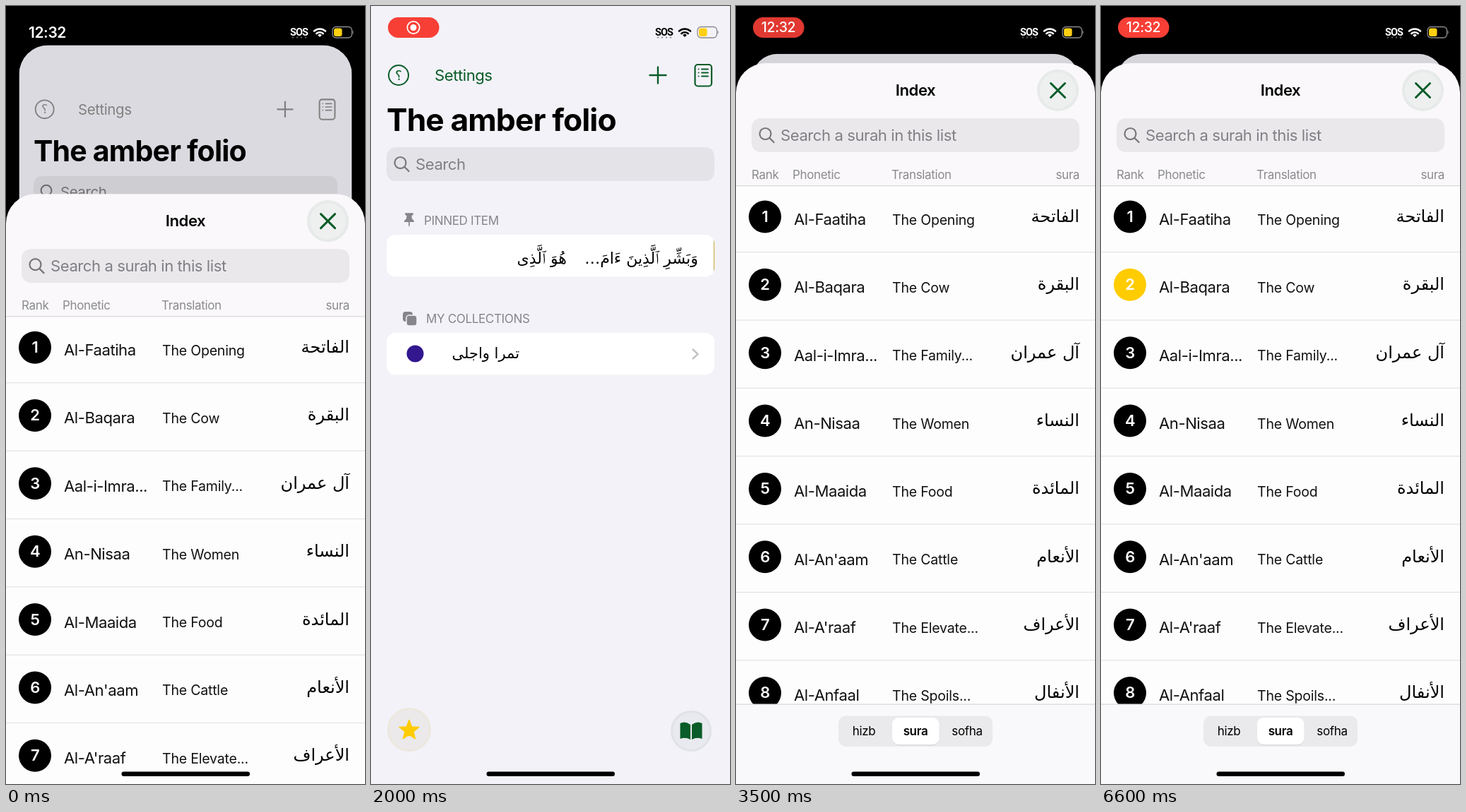
Animation of 508x1102 px, one loop 6.7 s. Source, as an HTML page:

```html
<!DOCTYPE html>
<html lang="en">
<head>
<meta charset="utf-8">
<style>
html, body { margin: 0; width: 100%; height: 100%; overflow: hidden; background: #000; }
svg { display: block; }
text { font-family: Inter, sans-serif; letter-spacing: -.02em; white-space: pre; }
.small { letter-spacing: -.01em; }
.ar { font-family: "DejaVu Sans", sans-serif; letter-spacing: 0; direction: rtl; }
.sos { font-family: Roboto, sans-serif; font-weight: 700; letter-spacing: -.06em; }
.mid { text-anchor: middle; }
.line { fill: none; stroke: currentColor; stroke-linecap: round; stroke-linejoin: round; }
</style>
</head>
<body>
<script>
const LOOP = 6700, STEP = 100, GRAY = '#8e8e93', YELLOW = '#ffcc00', GREEN = [10, 92, 40];
const OPEN_SHEET = 2317, CLOSE_PINNED = 1600, CLOSE_ROW = 4840, PITCH = 96.35;

const text = (x, y, size, str, attrs = '') =>
  `<text x="${x}" y="${y}" font-size="${size}" ${attrs}>${str}</text>`;
const rect = (x, y, w, h, fill, r = 0, attrs = '') =>
  `<rect x="${x}" y="${y}" width="${w}" height="${h}" rx="${r}" fill="${fill}" ${attrs}/>`;
const circle = (x, y, r, fill, attrs = '') =>
  `<circle cx="${x}" cy="${y}" r="${r}" fill="${fill}" ${attrs}/>`;
const line = (d, width, attrs = '') => `<path class="line" d="${d}" stroke-width="${width}" ${attrs}/>`;
const at = (x, y, body, attrs = '') => `<g transform="translate(${x} ${y})" ${attrs}>${body}</g>`;

const pin = '<path d="M-10-17H10V-13L6-10 7-2Q12 0 12 5H-12Q-12 0-7-2L-6-10-10-13ZM-1.5 5h3V13L0 17-1.5 13Z"/>';
const star = r => `<polygon points="${Array.from({ length: 10 }, (_, i) => {
  const a = i * Math.PI / 5, k = i % 2 ? r * .42 : r;
  return `${(k * Math.sin(a)).toFixed(2)},${(-k * Math.cos(a)).toFixed(2)}`;
}).join(' ')}" stroke="currentColor" stroke-width="1.5" stroke-linejoin="round"/>`;
const slash = bg => line('M-10-13L13 10', 2.5, `style="color:${bg}"`) + line('M-12-11L11 12', 2.2);
const scaled = (k, body) => `<g transform="scale(${k})">${body}</g>`;

const searchField = (y, label, fill) => rect(22, y, 464, 48, fill, 13)
  + line(`M47.5 ${y + 28}L53.5 ${y + 34}`, 2.3, 'style="color:#77777b"')
  + circle(41.5, y + 22, 8, 'none', 'stroke="#77777b" stroke-width="2.2"')
  + text(63, y + 32, 22.1, label, 'fill="#7f7f84"');

// Two buttons that grow from the right edge while a row slides left.
const actions = (id, y, h, left, right) => `<g id="${id}" fill="#fff" color="#fff">
  ${rect(0, y, 0, h, GRAY)}${rect(0, y, 0, h, YELLOW)}
  <g>${left}</g><g>${right}</g></g>`;

function slideRow(id, edge, midY, d) {
  document.getElementById(id + 'Row').setAttribute('transform', `translate(${-d} 0)`);
  const [gray, yellow, left, right] = document.getElementById(id).children;
  gray.setAttribute('x', edge - d);
  gray.setAttribute('width', d);
  yellow.setAttribute('x', edge - d / 2);
  yellow.setAttribute('width', d / 2);
  left.setAttribute('transform', `translate(${edge - d * .75} ${midY}) scale(${d / 200})`);
  right.setAttribute('transform', `translate(${edge - d * .25} ${midY}) scale(${d / 200})`);
}

const home = `
  ${rect(0, 0, 508, 1102, '#f3f2f8')}
  <g id="tint" fill="currentColor">
    ${circle(39, 98, 14, 'none', 'stroke="currentColor" stroke-width="2"')}
    ${text(39, 104.5, 19, '؟', 'class="ar mid"')}
    ${text(90, 106, 22.1, 'Settings')}
    ${line('M394.5 98H417.5M406 86.5V109.5', 2.4)}
    ${rect(458.5, 83, 23.5, 30.5, 'none', 4, 'stroke="currentColor" stroke-width="2.2"')}
    ${line('M463.5 89.5h.1M463.5 94.5h.1M463.5 99.5h.1M468 89.5h9M468 94.5h9M468 99.5h9', 1.8)}
  </g>
  ${text(22, 177, 44.3, 'The amber folio', 'font-weight="700"')}
  ${searchField(200, 'Search', '#e4e3e8')}
  <g fill="#85858a" class="small">
    ${at(54, 303, scaled(.58, pin))}
    ${text(75, 309.5, 17, 'PINNED ITEM')}
    ${rect(45, 433, 14, 14, '#85858a', 4)}
    ${rect(50, 438, 15, 15, '#85858a', 4, 'stroke="#f3f2f8" stroke-width="1.5"')}
    ${text(78, 448.5, 17, 'MY COLLECTIONS')}
  </g>
  <g clip-path="url(#pinnedClip)">
    ${rect(22, 324, 464, 60, '#fff')}
    <g id="pinnedRow">
      ${text(464, 365, 22, 'وَبَشِّرِ ٱلَّذِينَ ءَامَ…', 'class="ar"')}
      ${text(278, 365, 22, 'هُوَ ٱلَّذِى', 'class="ar"')}
    </g>
    ${actions('pinned', 324, 60, scaled(.8, pin) + slash(GRAY), star(12) + slash(YELLOW))}
  </g>
  ${rect(22, 463, 464, 59.5, '#fff', 13)}
  ${circle(62.5, 492.5, 12, '#32178f')}
  ${text(210, 499, 21, 'تمرا واجلی', 'class="ar"')}
  ${line('M455.5 486.5L462.5 493L455.5 499.5', 2.4, 'style="color:#c2c2c6"')}
  ${circle(54, 1025, 29.5, '#ebe9ea', 'stroke="#ece8df" stroke-width="3"')}
  ${at(54, 1026, star(14.5), `fill="${YELLOW}" color="${YELLOW}"`)}
  ${circle(453, 1027, 27.5, '#e9eaef', 'stroke="#e0e2e6" stroke-width="3"')}
  <path fill="#0a5c28" d="M452 1018Q445 1012 437.5 1016V1038Q445 1035 452 1039ZM454 1018Q461 1012 468.5 1016V1038Q461 1035 454 1039Z"/>`;

const suras = [
  ['Al-Faatiha', 'The Opening', 'الفاتحة'],
  ['Al-Baqara', 'The Cow', 'البقرة'],
  ['Aal-i-Imra...', 'The Family...', 'آل عمران'],
  ['An-Nisaa', 'The Women', 'النساء'],
  ['Al-Maaida', 'The Food', 'المائدة'],
  ["Al-An'aam", 'The Cattle', 'الأنعام'],
  ["Al-A'raaf", 'The Elevate...', 'الأعراف'],
  ['Al-Anfaal', 'The Spoils...', 'الأنفال'],
];

const suraRow = ([phonetic, translation, arabic], i) => {
  const y = i * PITCH;
  return `<g ${i === 1 ? 'id="cowRow"' : ''}>
    ${circle(41, 298.5 + y, 23, '#000')}
    ${text(41, 306 + y, 22, i + 1, 'class="mid" fill="#fff" font-weight="600"')}
    ${text(82, 310 + y, 22.1, phonetic, 'fill="#111"')}
    ${text(221, 309.5 + y, 19.5, translation, 'class="small" fill="#111"')}
    ${text(486, 306 + y, 24, arabic, 'class="ar"')}
  </g>${rect(0, 348 + y, 508, 1.2, '#e2e2e5')}`;
};

const sheet = `
  ${rect(0, 81, 508, 1200, '#faf8fb', 42)}
  ${text(254, 127, 22.1, 'Index', 'class="mid" font-weight="600"')}
  ${circle(455.5, 119.5, 27.5, '#eef0f0', 'stroke="#e6eae8" stroke-width="4"')}
  ${line('M445.5 109.5L465.5 129.5M465.5 109.5L445.5 129.5', 3, 'style="color:#0a5c28"')}
  ${searchField(159, 'Search a surah in this list', '#eae8eb')}
  <g class="small" fill="#8a8a8e">
    ${text(22, 244.5, 17, 'Rank')}${text(80, 244.5, 17, 'Phonetic')}
    ${text(220, 244.5, 17, 'Translation')}${text(486, 244.5, 17, 'sura', 'text-anchor="end"')}
  </g>
  ${rect(0, 255, 508, 860, '#fefdfe')}
  ${rect(0, 254, 508, 1.2, '#d8d7da')}
  ${suras.map(suraRow).join('')}
  ${actions('cow', 349, 96, pin, star(15.5))}
  ${rect(0, 989, 508, 300, '#f9f8fb')}
  ${rect(0, 988.5, 508, 1.2, '#d8d7da')}
  ${rect(145, 1005.5, 218, 43.5, '#eae9eb', 11)}
  ${rect(221, 1009, 66.5, 38.5, '#dcdbde', 9)}
  ${rect(221, 1008, 66.5, 38, '#fff', 9)}
  ${text(181, 1033, 17, 'hizb', 'class="mid"')}
  ${text(254, 1033, 17, 'sura', 'class="mid" font-weight="600"')}
  ${text(327, 1033, 17, 'sofha', 'class="mid"')}`;

const status = `
  <g id="status" fill="currentColor">
    ${text(32, 45, 21, '12:32', 'id="clock" font-weight="600"')}
    ${text(414.5, 41.5, 14.5, 'SOS', 'class="mid sos"')}
    ${line('M406 44.5H425', 2.5, 'stroke-dasharray="0 6" opacity=".35"')}
    ${at(444, 44, line('M-8-8.5A12 12 0 0 1 8-8.5M-4.7-5A7 7 0 0 1 4.7-5', 2.6)
      + '<path d="M0 0L-2.8-2.8A4 4 0 0 1 2.8-2.8Z"/>')}
  </g>
  ${rect(462, 29.5, 27.5, 15.5, 'none', 5, 'stroke="#8b8b8e" stroke-width="1.3"')}
  ${rect(464, 31.5, 11.5, 11.5, '#ffd012', 3)}
  <path d="M490.5 34.5Q493 37.2 490.5 40Z" fill="#8b8b8e"/>
  <g id="pill">
    ${rect(24, 16, 72.5, 29, '#ff3b30', 14.5)}
    <g id="recordMark">${circle(60, 30.5, 8.7, 'none', 'stroke="#fff" stroke-width="1.8"')}${circle(60, 30.5, 4.5, '#fff')}</g>
    ${text(60, 37, 19.5, '12:32', 'id="pillClock" class="mid" fill="#fff" font-weight="500"')}
  </g>
  ${rect(163.5, 1084.5, 181.5, 6.5, '#000', 3.2)}`;

document.body.innerHTML = `<svg width="508" height="1102" viewBox="0 0 508 1102">
  <defs>
    <clipPath id="cardClip"><rect id="card" width="508" height="1102"/></clipPath>
    <clipPath id="pinnedClip">${rect(22, 324, 464, 59.5, '#000', 13)}</clipPath>
  </defs>
  <g id="home" clip-path="url(#cardClip)">${home}<rect id="dim" width="508" height="1102"/></g>
  <g id="sheet">${sheet}</g>${status}</svg>`;

const $ = id => document.getElementById(id);
const set = (id, name, value) => $(id).setAttribute(name, value);
const clamp = x => Math.max(0, Math.min(1, x));
const ramp = (t, from, to) => clamp((t - from) / (to - from));
const smooth = x => x * x * (3 - 2 * x);
// Critically damped spring: starts at 1, settles to 0.
const spring = ms => {
  const u = Math.max(0, ms) * .01826;
  return (1 + u) * Math.exp(-u);
};

function draw(t) {
  const away = t < OPEN_SHEET ? 1 - spring(t + 42.3) : spring(t - OPEN_SHEET);
  const scale = .911 + .089 * away;
  set('home', 'transform', `translate(${254 * (1 - scale)} ${67.7 * (1 - away)}) scale(${scale})`);
  set('card', 'rx', t > 900 && t < OPEN_SHEET ? 0 : 40 + 26 * away);
  set('dim', 'opacity', .12 * (1 - away));
  set('sheet', 'transform', `translate(0 ${1021 * away})`);

  const vivid = ramp(away, .4, 1);
  $('tint').style.color = `rgb(${GREEN.map(c => 142 + (c - 142) * vivid)})`;
  const white = 255 * (t < OPEN_SHEET ? 1 - ramp(t, 50, 350) : ramp(t, OPEN_SHEET, 2700));
  $('status').style.color = `rgb(${white},${white},${white})`;

  const pulse = .5 - .5 * Math.cos((t - 4300) * Math.PI / 1000);
  const shade = 1 - .13 * pulse;
  set('clock', 'opacity', t < 300 ? 1 : 0);
  set('pill', 'opacity', ramp(t, 250, 400));
  $('pill').firstElementChild.setAttribute('fill', `rgb(${[255, 65, 55].map(c => c * shade)})`);
  set('recordMark', 'opacity', t < 3200 ? 1 : 0);
  set('pillClock', 'opacity', t < 3200 ? 0 : 1);

  slideRow('pinned', 486, 353, 200 * spring(t - CLOSE_PINNED));
  slideRow('cow', 508, 397, 200 * smooth(ramp(t, 3650, 4120)) * spring(t - CLOSE_ROW));
  $('cowRow').firstElementChild.setAttribute('fill', t < CLOSE_ROW ? '#000' : YELLOW);
}

// The picture advances ten times a second.
function tick() {
  draw(Math.floor(performance.now() % LOOP / STEP) * STEP);
  requestAnimationFrame(tick);
}
tick();
</script>
</body>
</html>
```
